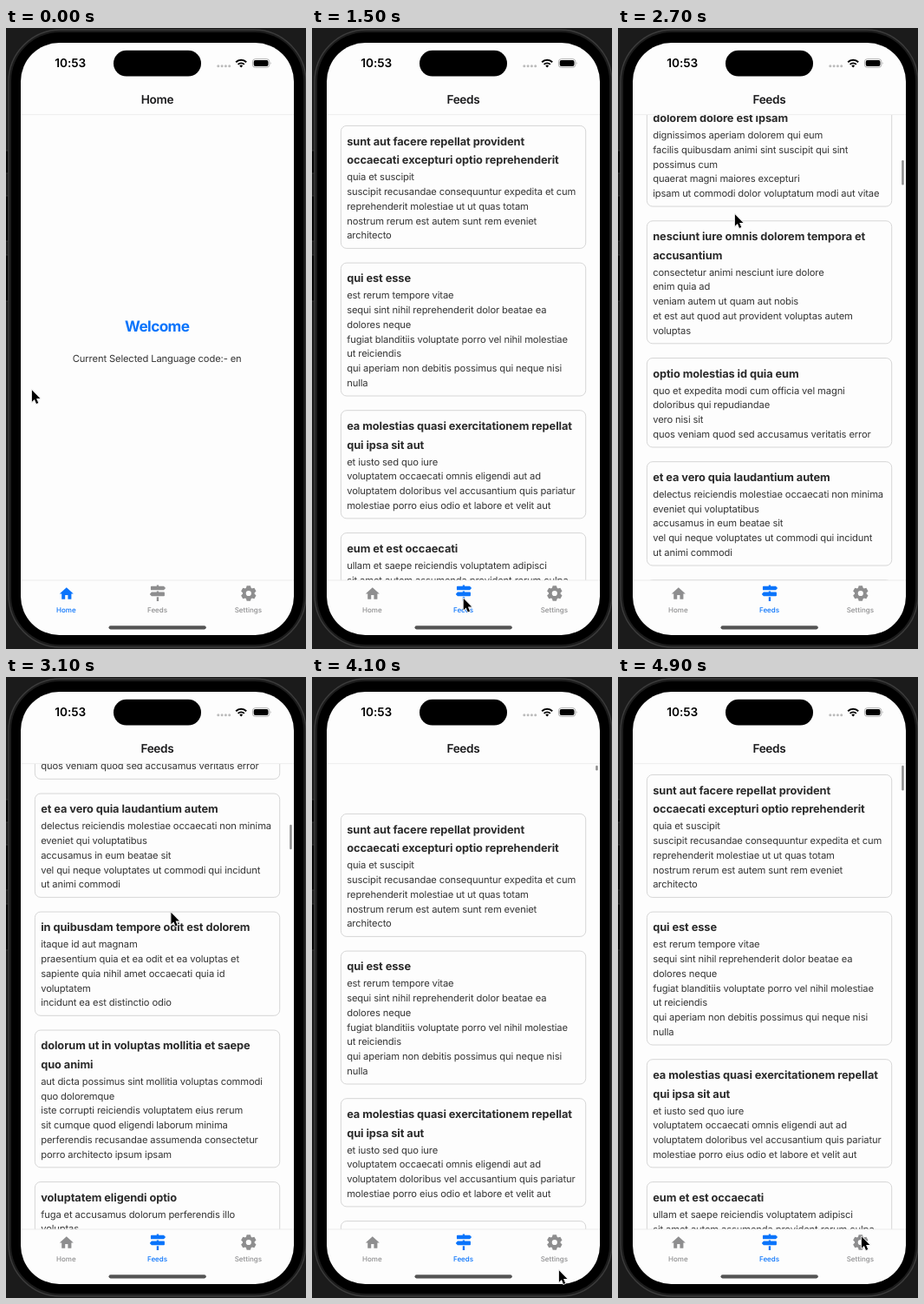
Animation of 346x714 px, one loop 5000 ms. Source, as an HTML page:

```html
<!DOCTYPE html>
<html lang="en">
<head>
<meta charset="utf-8">
<title>Feeds demo</title>
<style>
  html, body { margin: 0; width: 100%; height: 100%; overflow: hidden; background: #1b1b1b; }
  svg { display: block; width: 346px; height: 714px; }
  text { font-family: Inter, sans-serif; text-rendering: geometricPrecision; }
  .mid { text-anchor: middle; }
  .bar { font-size: 13.6px; font-weight: 600; letter-spacing: -.32px; fill: #1a1a1c; }
  .clock { letter-spacing: -.02px; fill: #000; }
  .welcome { font-size: 17.2px; font-weight: 700; letter-spacing: -.6px; fill: #0a74fb; }
  .title { font-size: 12.8px; font-weight: 700; letter-spacing: -.07px; fill: #2b2b2b; }
  .body { font-size: 11.2px; letter-spacing: -.125px; fill: #353535; }
  .card { fill: none; stroke: #d2d2d2; stroke-width: .9; }
  .tab { fill: #8e8e8f; }
  .tab.on { fill: #0a74fb; }
  .tab text { font-size: 8px; font-weight: 500; text-anchor: middle; }
</style>
</head>
<body>
<svg viewBox="0 0 346 714">
  <defs>
    <clipPath id="view"><rect x="17" y="100" width="315" height="535"/></clipPath>
  </defs>

  <!-- device -->
  <rect width="346" height="714" fill="#1b1b1b"/>
  <g fill="#050505" stroke="#3a3a3a" stroke-width=".8">
    <rect x="-2" y="141" width="5" height="26"/>
    <rect x="-2" y="193" width="5" height="52"/>
    <rect x="-2" y="261" width="5" height="53"/>
  </g>
  <rect x="3" y="2" width="343" height="710" rx="60" fill="#1c1c1c" stroke="#3c3c3c" stroke-width="1.4"/>
  <rect x="6" y="5" width="337" height="704" rx="56" fill="#000"/>
  <rect x="17" y="17" width="315" height="681" rx="44.5" fill="#fdfdfd"/>

  <!-- status bar -->
  <text class="bar clock" x="56.3" y="45.4">10:53</text>
  <rect x="124" y="25.8" width="101" height="29.7" rx="14.85"/>
  <g fill="#bcbcbc">
    <circle cx="244.8" cy="43.8" r="1.5"/><circle cx="249.1" cy="43.8" r="1.5"/>
    <circle cx="253.4" cy="43.8" r="1.5"/><circle cx="257.7" cy="43.8" r="1.5"/>
  </g>
  <g fill="none" stroke="#000" stroke-width="2">
    <path d="M265.2 39.2a8.6 8.6 0 0 1 12 0M267.6 41.9a5.1 5.1 0 0 1 7.2 0"/>
    <path d="M271.2 45.4l-1.9-2a2.7 2.7 0 0 1 3.8 0z" fill="#000" stroke="none"/>
  </g>
  <rect x="284.4" y="35.7" width="19.4" height="9.6" rx="3" fill="none" stroke="#a5a5a5" stroke-width=".9"/>
  <rect x="285.7" y="37" width="16.8" height="7" rx="1.9"/>
  <path d="M304.9 38.9q1.5 1.6 0 3.2z" fill="#a5a5a5"/>

  <text id="heading" class="bar mid" x="174.4" y="86.6">Home</text>
  <path d="M17 99.6H332" stroke="#ececec" stroke-width=".9"/>

  <g id="home">
    <text class="welcome mid" x="174.2" y="348.8">Welcome</text>
    <text class="body mid" x="174.2" y="384.2">Current Selected Language code:- en</text>
  </g>
  <g id="feed" clip-path="url(#view)"><g id="list"></g></g>
  <rect id="thumb" x="327.2" width="2.5" rx="1.25" fill="#8c8c8c"/>

  <!-- tab bar -->
  <path d="M17 635H332" stroke="#e9e9e9" stroke-width=".9"/>
  <g id="tabHome" class="tab">
    <path d="M69.8 643.2L77.8 650.4H75.4V656.2Q75.4 656.8 74.8 656.8H71.4V652H68.2V656.8H64.8Q64.2 656.8 64.2 656.2V650.4H61.8Z"/>
    <text x="69.3" y="671.7">Home</text>
  </g>
  <g id="tabFeeds" class="tab">
    <path transform="translate(165.8 640.6) scale(.0357)"
      d="M224 0h64v32h166l58 64-58 64H56q-24 0-24-24V56q0-24 24-24h168z
      M224 192h64v32h168q24 0 24 24v80q0 24-24 24H58L0 288l58-64h166z M224 384h64v128h-64z"/>
    <text x="174.5" y="671.7">Feeds</text>
  </g>
  <g class="tab">
    <g id="gear" transform="translate(279.8 650)"><circle r="6.7"/></g>
    <circle cx="279.8" cy="650" r="3.1" fill="#fdfdfd"/>
    <text x="279.4" y="671.7">Settings</text>
  </g>
  <rect x="118.5" y="687.2" width="112.3" height="4.2" rx="2.1" fill="#545454"/>

  <g id="cursor">
    <path d="M.4 .8V14.3L3.4 11.5L5.5 16.4L7.7 15.4L5.6 10.6H9.9Z"
      stroke="#fff" stroke-width="1.6" stroke-linejoin="round" paint-order="stroke"
      style="filter: drop-shadow(0 .6px .6px rgb(0 0 0 / .35))"/>
  </g>
</svg>
<script>
// One post per line: title lines, then "/", then body lines.
const posts = `sunt aut facere repellat provident|occaecati excepturi optio reprehenderit/quia et suscipit|suscipit recusandae consequuntur expedita et cum|reprehenderit molestiae ut ut quas totam|nostrum rerum est autem sunt rem eveniet|architecto
qui est esse/est rerum tempore vitae|sequi sint nihil reprehenderit dolor beatae ea|dolores neque|fugiat blanditiis voluptate porro vel nihil molestiae|ut reiciendis|qui aperiam non debitis possimus qui neque nisi|nulla
ea molestias quasi exercitationem repellat|qui ipsa sit aut/et iusto sed quo iure|voluptatem occaecati omnis eligendi aut ad|voluptatem doloribus vel accusantium quis pariatur|molestiae porro eius odio et labore et velit aut
eum et est occaecati/ullam et saepe reiciendis voluptatem adipisci|sit amet autem assumenda provident rerum culpa|quis hic commodi nesciunt rem tenetur doloremque|ipsam iure|quis sunt voluptatem rerum illo velit
nesciunt quas odio/repudiandae veniam quaerat sunt sed|alias aut fugiat sit autem sed est|voluptatem omnis possimus esse voluptatibus quis|est aut tenetur dolor neque
dolorem eum magni eos aperiam quia/ut aspernatur corporis harum nihil quis provident|sequi|mollitia nobis aliquid molestiae|perspiciatis et ea nemo ab reprehenderit|accusantium quas|voluptate dolores velit et doloremque molestiae
magnam facilis autem/dolore placeat quibusdam ea quo vitae|magni quis enim qui quis quo nemo aut saepe|quidem repellat excepturi ut quia|sunt ut sequi eos ea sed quas
dolorem dolore est ipsam/dignissimos aperiam dolorem qui eum|facilis quibusdam animi sint suscipit qui sint|possimus cum|quaerat magni maiores excepturi|ipsam ut commodi dolor voluptatum modi aut vitae
nesciunt iure omnis dolorem tempora et|accusantium/consectetur animi nesciunt iure dolore|enim quia ad|veniam autem ut quam aut nobis|et est aut quod aut provident voluptas autem|voluptas
optio molestias id quia eum/quo et expedita modi cum officia vel magni|doloribus qui repudiandae|vero nisi sit|quos veniam quod sed accusamus veritatis error
et ea vero quia laudantium autem/delectus reiciendis molestiae occaecati non minima|eveniet qui voluptatibus|accusamus in eum beatae sit|vel qui neque voluptates ut commodi qui incidunt|ut animi commodi
in quibusdam tempore odit est dolorem/itaque id aut magnam|praesentium quia et ea odit et ea voluptas et|sapiente quia nihil amet occaecati quia id|voluptatem|incidunt ea est distinctio odio
dolorum ut in voluptas mollitia et saepe|quo animi/aut dicta possimus sint mollitia voluptas commodi|quo doloremque|iste corrupti reiciendis voluptatem eius rerum|sit cumque quod eligendi laborum minima|perferendis recusandae assumenda consectetur|porro architecto ipsum ipsam
voluptatem eligendi optio/fuga et accusamus dolorum perferendis illo|voluptas|non doloremque neque facere|ad qui dolorum molestiae accusamus`
  .split('\n').map(post => post.split('/').map(part => part.split('|')));

const $ = id => document.getElementById(id);

function add(parent, tag, attrs, text = '') {
  const node = document.createElementNS('http://www.w3.org/2000/svg', tag);
  for (const name in attrs) node.setAttribute(name, attrs[name]);
  node.textContent = text;
  parent.append(node);
}

const TITLE = 21.7, BODY = 16.8, GAP = 16.7, PADDING = 13.6;
let cardTop = 112;
for (const [title, body] of posts) {
  const height = title.length * TITLE + body.length * BODY + PADDING;
  const firstTitle = cardTop + 22.6;
  const firstBody = firstTitle + 18.9 + (title.length - 1) * TITLE;
  add($('list'), 'rect', { class: 'card', x: 33.4, y: cardTop + .4, width: 282.3, height, rx: 6.5 });
  title.forEach((line, i) => add($('list'), 'text', { class: 'title', x: 40.2, y: firstTitle + i * TITLE }, line));
  body.forEach((line, i) => add($('list'), 'text', { class: 'body', x: 40.2, y: firstBody + i * BODY }, line));
  cardTop += height + GAP;
}

for (let angle = 0; angle < 360; angle += 60)
  add($('gear'), 'path', { d: 'M-3.3-5L-2.1-8.8H2.1L3.3-5Z', transform: `rotate(${angle})` });

// Keys are [time, value...] with linear travel between them.
const scrollKeys = [
  [1900, 0], [2000, 30], [2100, 110], [2200, 229.5], [2400, 560], [2700, 1022],
  [2900, 1260], [3200, 1450], [3500, 1208.2], [3700, 900], [3900, 330],
  [4000, 60], [4100, -45], [4200, -22], [4300, -8], [4500, 0]
];
const cursorKeys = [
  [0, 29.5, 415.5], [100, 199, 339], [300, 199, 339], [400, 196, 420], [500, 186, 560],
  [600, 178, 660], [700, 174, 682], [800, 174, 682], [1100, 174.3, 655], [1800, 174.3, 655],
  [1900, 160, 560], [2000, 148, 470], [2200, 139.5, 263.5], [2300, 138, 225], [2500, 140, 430],
  [2700, 134.5, 213.5], [3100, 190, 270], [3500, 236, 557], [3700, 262, 694],
  [4000, 284, 695], [4100, 284.5, 681.5], [4300, 284, 674], [4800, 282, 655], [4900, 280.5, 642.5]
];

function sample(keys, t) {
  const next = keys.findIndex(key => key[0] > t);
  if (next < 0) return keys[keys.length - 1].slice(1);
  if (next === 0) return keys[0].slice(1);
  const from = keys[next - 1], to = keys[next];
  const k = (t - from[0]) / (to[0] - from[0]);
  return from.slice(1).map((value, i) => value + (to[i + 1] - value) * k);
}

const show = (id, on) => $(id).style.display = on ? '' : 'none';

function draw(now) {
  const t = Math.floor(now % 5000 / 100) * 100;
  const onFeeds = t >= 1000;
  const [scroll] = sample(scrollKeys, t);
  const [x, y] = sample(cursorKeys, t);

  $('heading').textContent = onFeeds ? 'Feeds' : 'Home';
  $('tabHome').classList.toggle('on', !onFeeds);
  $('tabFeeds').classList.toggle('on', onFeeds);
  show('home', !onFeeds);
  show('feed', t >= 1500);
  show('thumb', t >= 2000);

  $('list').setAttribute('transform', `translate(0 ${-scroll})`);
  $('thumb').setAttribute('y', 101.8 + Math.max(0, scroll) / 20.4);
  $('thumb').setAttribute('height', Math.max(5.6, 28.6 + Math.min(0, scroll)));
  $('cursor').setAttribute('transform', `translate(${x} ${y})`);
}

const start = performance.now();
(function tick() {
  draw(performance.now() - start);
  requestAnimationFrame(tick);
})();
</script>
</body>
</html>
```
